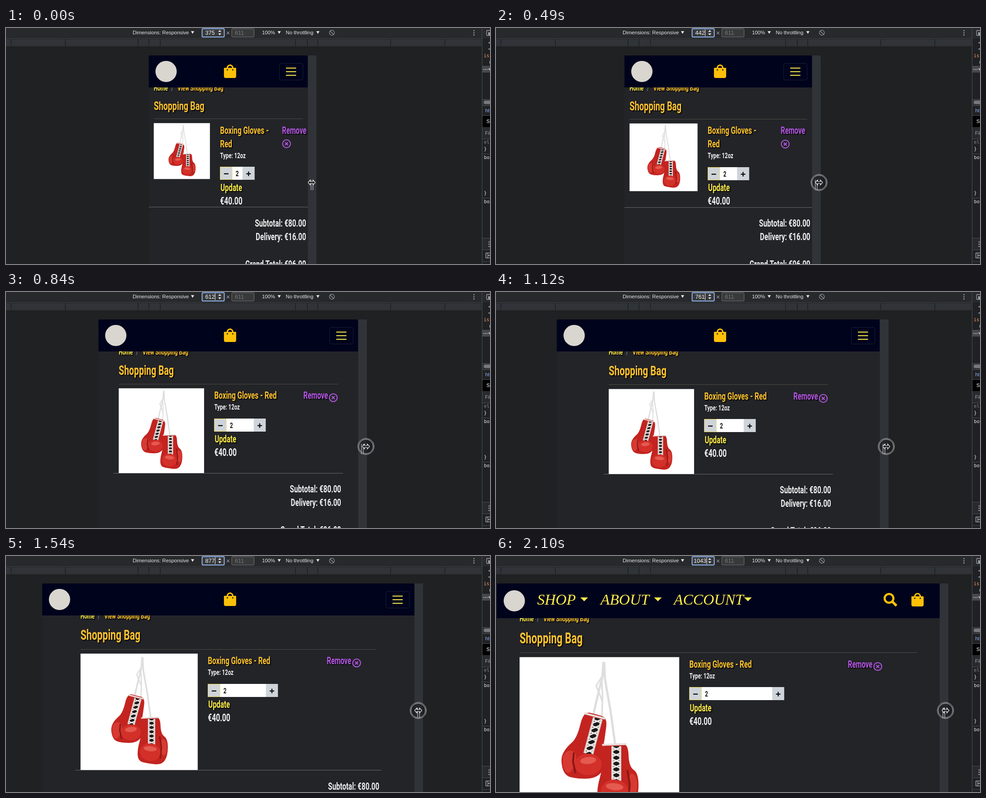
Write an HTML page with a canvas that moves like this. It is 1070x524 px and loops after 2.17 s.

```html
<!DOCTYPE html>
<html lang="en">
<head>
<meta charset="utf-8">
<title>Responsive shopping bag</title>
<style>
  html, body { margin: 0; width: 100%; height: 100%; overflow: hidden; background: #202123; }
  canvas { display: block; width: 1070px; height: 524px; }
</style>
</head>
<body>
<canvas id="stage" width="1070" height="524"></canvas>
<script>
const ctx = document.getElementById('stage').getContext('2d');
const LOOP = 2170, STEP = 70;
const ZOOM = 0.9386, CENTER = 491.4, PAGE_TOP = 61;
const AMBER = '#ffc42e', YELLOW = '#ffee4a', PURPLE = '#b757e6', LIGHT = '#f0f0f1';
const SANS = '"Liberation Sans", Arial, sans-serif';
const MONO = '"DejaVu Sans Mono", monospace';

// time, viewport width, pointer distance from the middle of the drag handle
const KEYS = [
  [0, 375, -1], [140, 375, -1], [280, 377, -1.5], [420, 412, 4], [630, 501, 10],
  [1120, 761, 5], [1190, 798, 4], [1330, 836, 1], [1540, 877, -1],
  [1750, 924, 2], [1820, 935, 3.5], [1960, 984, 5], [2100, 1043, 3.5]
];

function pose(t) {
  const i = Math.max(1, KEYS.findIndex(k => k[0] >= t));
  const [a, b] = [KEYS[i - 1], KEYS[i]];
  const f = (t - a[0]) / (b[0] - a[0]);
  return { width: Math.round(a[1] + (b[1] - a[1]) * f), lead: a[2] + (b[2] - a[2]) * f };
}

function rect(x, y, w, h, color) {
  ctx.fillStyle = color;
  ctx.fillRect(x, y, w, h);
}

function frame(x, y, w, h, r, stroke, lineWidth = 1, fill) {
  ctx.beginPath();
  ctx.roundRect(x, y, w, h, r);
  if (fill) { ctx.fillStyle = fill; ctx.fill(); }
  ctx.strokeStyle = stroke;
  ctx.lineWidth = lineWidth;
  ctx.stroke();
}

function line(points, color, width = 1) {
  ctx.beginPath();
  points.forEach(([x, y]) => ctx.lineTo(x, y));
  ctx.strokeStyle = color;
  ctx.lineWidth = width;
  ctx.stroke();
}

function polygon(points, color) {
  ctx.beginPath();
  points.forEach(([x, y]) => ctx.lineTo(x, y));
  ctx.fillStyle = color;
  ctx.fill();
}

function disc(x, y, r, color) {
  ctx.beginPath();
  ctx.arc(x, y, r, 0, 7);
  ctx.fillStyle = color;
  ctx.fill();
}

function ring(x, y, r, color, width) {
  ctx.beginPath();
  ctx.arc(x, y, r, 0, 7);
  ctx.strokeStyle = color;
  ctx.lineWidth = width;
  ctx.stroke();
}

function caretDown(x, y, half, height, color) {
  polygon([[x - half, y], [x + half, y], [x, y + height]], color);
}

function label(text, x, y, size, color, family = SANS, align = 'left', style = '') {
  ctx.font = `${style} ${size}px ${family}`;
  ctx.textAlign = align;
  ctx.fillStyle = color;
  ctx.fillText(text, x, y);
}

// Tall narrow headline face, the same proportions for every text.
function narrow(text, x, y, size, color, { align = 'left', shadow = false } = {}) {
  ctx.save();
  if (shadow) {
    ctx.shadowColor = 'rgba(0,0,0,.85)';
    ctx.shadowOffsetX = ctx.shadowOffsetY = 2;
    ctx.shadowBlur = 2;
  }
  ctx.translate(x, y);
  ctx.scale(0.68, 1);
  label(text, 0, 0, size * 1.14, color, 'Roboto, sans-serif', align, '600');
  ctx.restore();
}

function blob(points, color) {
  const mid = (a, b) => [(a[0] + b[0]) / 2, (a[1] + b[1]) / 2];
  ctx.beginPath();
  ctx.moveTo(...mid(points[points.length - 1], points[0]));
  points.forEach((p, i) => ctx.quadraticCurveTo(...p, ...mid(p, points[(i + 1) % points.length])));
  ctx.fillStyle = color;
  ctx.fill();
}

function oval(x, y, rx, ry, angle, color) {
  ctx.beginPath();
  ctx.ellipse(x, y, rx, ry, angle, 0, 7);
  ctx.fillStyle = color;
  ctx.fill();
}

function laces(x0, y0, x1, y1) {
  line([[x0, y0], [x1, y1]], '#d9d3d0', 0.062);
  line([[x0, y0], [x1, y1]], '#1d1a1b', 0.036);
  for (let i = 0; i < 6; i++) {
    const f = (i + 0.4) / 6, x = x0 + (x1 - x0) * f, y = y0 + (y1 - y0) * f;
    line([[x - 0.028, y - 0.008], [x + 0.026, y + 0.014]], '#eeeae7', 0.009);
    line([[x - 0.026, y + 0.014], [x + 0.028, y - 0.008]], '#eeeae7', 0.009);
  }
}

function glovesPhoto(x, y, size) {
  ctx.save();
  ctx.translate(x, y);
  ctx.scale(size, size);
  rect(0, 0, 1, 1, '#fff');
  const cord = '#dededf';
  line([[.525, .03], [.52, .12], [.49, .24], [.46, .37]], cord, .014);
  line([[.525, .03], [.515, .15], [.52, .25], [.515, .38]], cord, .01);
  line([[.53, .03], [.535, .14], [.57, .34], [.6, .56]], cord, .014);
  line([[.53, .1], [.48, .18], [.52, .28]], cord, .01);

  blob([[.4, .34], [.48, .36], [.55, .38], [.535, .5], [.52, .59], [.53, .71], [.47, .765],
        [.36, .765], [.28, .745], [.255, .64], [.29, .57], [.36, .51]], '#c32420');
  blob([[.27, .61], [.32, .58], [.36, .61], [.34, .7], [.3, .74], [.27, .69]], '#d63a32');
  line([[.34, .6], [.335, .66], [.35, .73]], '#8b1714', .012);
  laces(.49, .385, .43, .61);
  oval(.43, .675, .085, .068, 0, '#d3302a');
  oval(.43, .65, .05, .022, -.1, '#e45a50');
  line([[.405, .353], [.535, .387]], '#e8dedb', .012);

  blob([[.51, .545], [.6, .55], [.68, .54], [.685, .69], [.745, .73], [.745, .88], [.69, .955],
        [.57, .94], [.49, .92], [.485, .82], [.52, .7]], '#c32420');
  blob([[.69, .72], [.735, .75], [.738, .84], [.71, .89], [.68, .82]], '#d63a32');
  line([[.675, .71], [.69, .8], [.68, .9]], '#8b1714', .012);
  laces(.606, .56, .606, .78);
  oval(.595, .845, .087, .075, .1, '#d3302a');
  oval(.595, .815, .055, .022, .1, '#e45a50');
  line([[.517, .552], [.668, .547]], '#e8dedb', .012);
  ctx.restore();
}

function shoppingBag(x, y) {
  ctx.beginPath();
  ctx.roundRect(x - 13.5, y - 8, 27, 22.5, [1, 1, 4, 4]);
  ctx.fillStyle = '#ffc107';
  ctx.fill();
  ctx.beginPath();
  ctx.moveTo(x - 6, y - 3);
  ctx.lineTo(x - 6, y - 8);
  ctx.arc(x, y - 8, 6, Math.PI, 0);
  ctx.lineTo(x + 6, y - 3);
  ctx.strokeStyle = '#ffc107';
  ctx.lineWidth = 3;
  ctx.stroke();
  disc(x - 6, y - 3.5, 1.4, '#00031c');
  disc(x + 6, y - 3.5, 1.4, '#00031c');
}

function navbar(left, right, wide) {
  rect(left, PAGE_TOP, right - left, wide ? 77 : 71, '#00031c');
  disc(left + 38.5, wide ? 99.5 : 96.5, 23.5, '#d9d6d0');
  if (!wide) {
    shoppingBag(495.3, 96.5);
    frame(right - 63, 78.5, 52, 37, 4, '#1d2036');
    for (const y of [88, 96, 104]) rect(right - 48.5, y, 22.5, 2, YELLOW);
    return;
  }
  [['SHOP', 90, 193], ['ABOUT', 230, 356], ['ACCOUNT', 392, 555]].forEach(([text, x, caretX]) => {
    label(text, left + x - 1, 108, 33.5, YELLOW, '"Liberation Serif", "Times New Roman", serif', 'left', 'italic');
    caretDown(left + caretX, 92, 8.5, 8.5, YELLOW);
  });
  ring(right - 112, 94, 9.7, '#ffc107', 4.6);
  line([[right - 105, 101], [right - 95.5, 110.5]], '#ffc107', 5.5);
  shoppingBag(right - 49, 97.5);
}

function quantity(x, y, width) {
  rect(x, y, width, 29, '#fff');
  rect(x, y, 27, 29, '#ced4da');
  rect(x + width - 26.5, y, 26.5, 29, '#ced4da');
  frame(x + .5, y + .5, 26, 28, 0, '#f5dc55');
  rect(x + 8.5, y + 14.5, 10, 2.4, '#111');
  const plusX = x + width - 13.2;
  rect(plusX - 5, y + 14.5, 10, 2.4, '#111');
  rect(plusX - 1.2, y + 10.7, 2.4, 10, '#111');
  narrow('2', x + 34.5, y + 21, 15, '#111');
}

function removeLink(x, baseline, wraps) {
  narrow('Remove', x, baseline, 19.2, PURPLE, { shadow: true });
  const cx = x + (wraps ? 10 : 66), cy = baseline + (wraps ? 22.5 : -2.5);
  ring(cx, cy, 8.7, PURPLE, 2);
  line([[cx - 3.3, cy - 3.3], [cx + 3.3, cy + 3.3]], PURPLE, 2);
  line([[cx - 3.3, cy + 3.3], [cx + 3.3, cy - 3.3]], PURPLE, 2);
}

function containerWidth(width) {
  return width >= 992 ? 960 : width >= 768 ? 720 : width >= 576 ? 540 : width;
}

function page(width) {
  const left = CENTER - width * ZOOM / 2, right = CENTER + width * ZOOM / 2;
  const wide = width >= 992;
  const box = containerWidth(width);
  const span = box * ZOOM, boxLeft = CENTER - span / 2, boxRight = CENTER + span / 2;
  const gutter = 12 * ZOOM, x = boxLeft + gutter;
  const navShift = wide ? 6 : 0;
  const growth = 0.011 * (width - 375);
  const drop = growth + navShift;
  const shadow = { shadow: true };

  ctx.save();
  ctx.beginPath();
  ctx.rect(left, PAGE_TOP, right - left, 463);
  ctx.clip();
  rect(left, PAGE_TOP, right - left, 463, '#232428');

  narrow('Home', x, 139 + navShift, 15, YELLOW, shadow);
  narrow('/', x + 38.5, 139 + navShift, 15, '#74777b');
  narrow('View Shopping Bag', x + 52.5, 139 + navShift, 15, AMBER, shadow);
  narrow('Shopping Bag', x, 182 + growth * .75 + navShift, 19.9 + .00845 * width, AMBER, shadow);
  rect(x, Math.round(201 + drop), span - 2 * gutter, 1, '#4f4c45');

  const photoSize = span * 5 / 12 - 2 * gutter, photoTop = 211.2 + drop;
  glovesPhoto(x, photoTop, photoSize);

  const infoX = x + span * 5 / 12;
  const infoColumn = span * 7 / 18;
  const wraps = box < 540;
  if (box < 448) {
    narrow('Boxing Gloves -', infoX, 234.5 + drop, 19.7, AMBER, shadow);
    narrow('Red', infoX, 264.5 + drop, 19.7, AMBER, shadow);
  } else {
    narrow('Boxing Gloves - Red', infoX, 234.5 + drop, 19.7, AMBER, shadow);
  }
  removeLink(infoX + infoColumn, 234.5 + drop, wraps);

  const y = drop - (wraps ? 0 : 30);
  narrow('Type: 12oz', infoX, 288.5 + y, 14.8, LIGHT);
  quantity(infoX, Math.round(308 + y), infoColumn * .625 - 9.5);
  narrow('Update', infoX + 1, 361.5 + y, 19.2, YELLOW, shadow);
  narrow('€40.00', infoX, 391.5 + y, 20.2, LIGHT);

  const ruleY = Math.max(photoTop + photoSize, 397.5 + y);
  rect(boxLeft, Math.floor(ruleY), span, 1, '#6a6b6e');
  [['Subtotal: €80.00', 43], ['Delivery: €16.00', 73], ['Grand Total: €96.00', 134]].forEach(([text, dy]) =>
    narrow(text, boxRight - 4, ruleY + dy, 19.6, LIGHT, { align: 'right' }));

  navbar(left, right, wide);
  ctx.restore();
  return right;
}

function toolbar(width, editing) {
  rect(0, 0, 1052, 23, '#28292b');
  rect(0, 23, 1052, 1, '#414346');
  rect(0, 25, 1051, 15.5, '#303439');
  for (const x of [11, 131, 292, 316, 341, 640, 666, 689, 850, 970]) rect(x - .5, 25, 1.5, 15.5, '#1d1e20');

  const ink = '#e6e7e9';
  label('Dimensions: Responsive', 280, 14, 11.3, ink);
  label('100%', 566, 14, 11.3, ink);
  label('No throttling', 618.5, 14, 11.3, ink);
  for (const x of [412.5, 604, 689.5]) caretDown(x, 7, 3.5, 6, ink);

  frame(433.5, 1.5, 49, 18.5, 2, '#8fb3ee', 2, '#38393b');
  label(width, 451, 15, 12.7, '#f4f4f4', SANS, 'center');
  if (editing) rect(451 + ctx.measureText(width).width / 2 + .3, 3, 1, 15, '#fff');
  polygon([[469, 8.5], [476, 8.5], [472.5, 4.5]], ink);
  polygon([[469, 12], [476, 12], [472.5, 16]], ink);
  label('×', 490.8, 16, 14, '#a5a7aa', SANS, 'center');
  frame(499, 1.5, 49.5, 18.5, 2, '#747577', 1, '#38393b');
  label('611', 506, 15, 12.7, '#77787a');

  ring(720.5, 10.5, 5.5, '#8f9296', 1.3);
  line([[716, 6], [725, 15]], '#8f9296', 1.5);
  for (const y of [6, 10.7, 15.4]) disc(1034.5, y, 1.3, '#a9abae');
}

function sidePanel() {
  rect(1052, 0, 18, 524, '#202124');
  rect(1054, 0, 16, 23, '#292a2d');
  frame(1062.5, 5.5, 12, 11, 1, '#9aa0a6', 1.3);
  polygon([[1066, 9], [1070, 10], [1070, 16], [1066, 16]], '#9aa0a6');
  label('<', 1066, 36, 10.5, '#c7c9cc', MONO);
  label('<', 1066, 50, 10.5, '#c7c9cc', MONO);
  label('is', 1056, 65, 10.5, '#f29766', MONO);
  label('n', 1068, 79, 10.5, '#c7c9cc', MONO);
  rect(1053, 84, 17, 15, '#46484c');
  for (const x of [1056.5, 1060, 1063.5]) disc(x, 92, 1.1, '#c4c6c9');
  caretDown(1069, 90, 3, 4, '#c4c6c9');
  rect(1053, 158, 17, 14, '#303134');
  rect(1053, 158, 17, 1, '#494b4e');
  ctx.beginPath();
  ctx.roundRect(1056, 161, 24, 8, 4);
  ctx.fillStyle = '#76777a';
  ctx.fill();
  label('ht', 1059.5, 187, 11.3, '#8ab4f8');
  rect(1053, 195, 17, 25, '#000');
  label('S', 1062, 211, 11.3, '#fff');
  rect(1053, 220, 17, 26, '#292a2d');
  label('Fil', 1059, 237, 11.3, '#9aa0a6');
  for (const y of [172, 194, 246, 279, 377, 466, 492, 518]) rect(1053, y, 17, 1, '#494b4e');
  label('el', 1056.5, 257, 10.5, '#85898d', MONO);
  label('}', 1056.5, 272, 10.5, '#e4e5e7', MONO);
  label('bo', 1056.5, 291, 10.5, '#e4e5e7', MONO);
  label('}', 1056.5, 370, 10.5, '#e4e5e7', MONO);
  label('bo', 1056.5, 389, 10.5, '#e4e5e7', MONO);
  rect(1053, 467, 17, 25, '#292a2d');
  for (const y of [475, 480, 485]) disc(1068, y, 1.3, '#a9abae');
  frame(1060.5, 499.5, 14, 11, 1, '#9aa0a6', 1.3);
  line([[1064, 500], [1064, 511]], '#9aa0a6', 1.2);
  polygon([[1066, 502], [1066, 508], [1070, 505]], '#9aa0a6');
  rect(1052, 0, 1.2, 524, '#494b4e');
}

function pointer(handleX, lead, pressed) {
  const x = handleX + lead, y = 343;
  if (pressed) {
    disc(x, y, 18, 'rgba(28,29,31,.55)');
    ring(x, y, 18, '#b9babc', 1);
    ring(x, y, 16, '#d2d3d4', 1);
  }
  rect(handleX - 3, 337, 1.5, 23, '#a6a9ac');
  rect(handleX + 1.2, 337, 1.5, 23, '#a6a9ac');
  const half = [[-8, 0], [-3, -5.5], [-3, -2], [3, -2], [3, -5.5], [8, 0],
                [3, 5.5], [3, 2], [-3, 2], [-3, 5.5]].map(([dx, dy]) => [x + dx, y + dy]);
  polygon(half, '#151618');
  line([...half, half[0]], '#f4f4f4', 1.2);
}

function draw(t) {
  const { width, lead } = pose(t);
  const pressed = t >= 140;
  rect(0, 0, 1070, 524, '#202123');
  const right = page(width);
  rect(right, PAGE_TOP, 19, 463, '#303439');
  toolbar(width, pressed);
  sidePanel();
  pointer(right + 9.3, lead, pressed);
}

const start = performance.now();
function tick() {
  const elapsed = (performance.now() - start) % LOOP;
  draw(Math.floor(elapsed / STEP) * STEP);
  requestAnimationFrame(tick);
}
tick();
</script>
</body>
</html>
```
